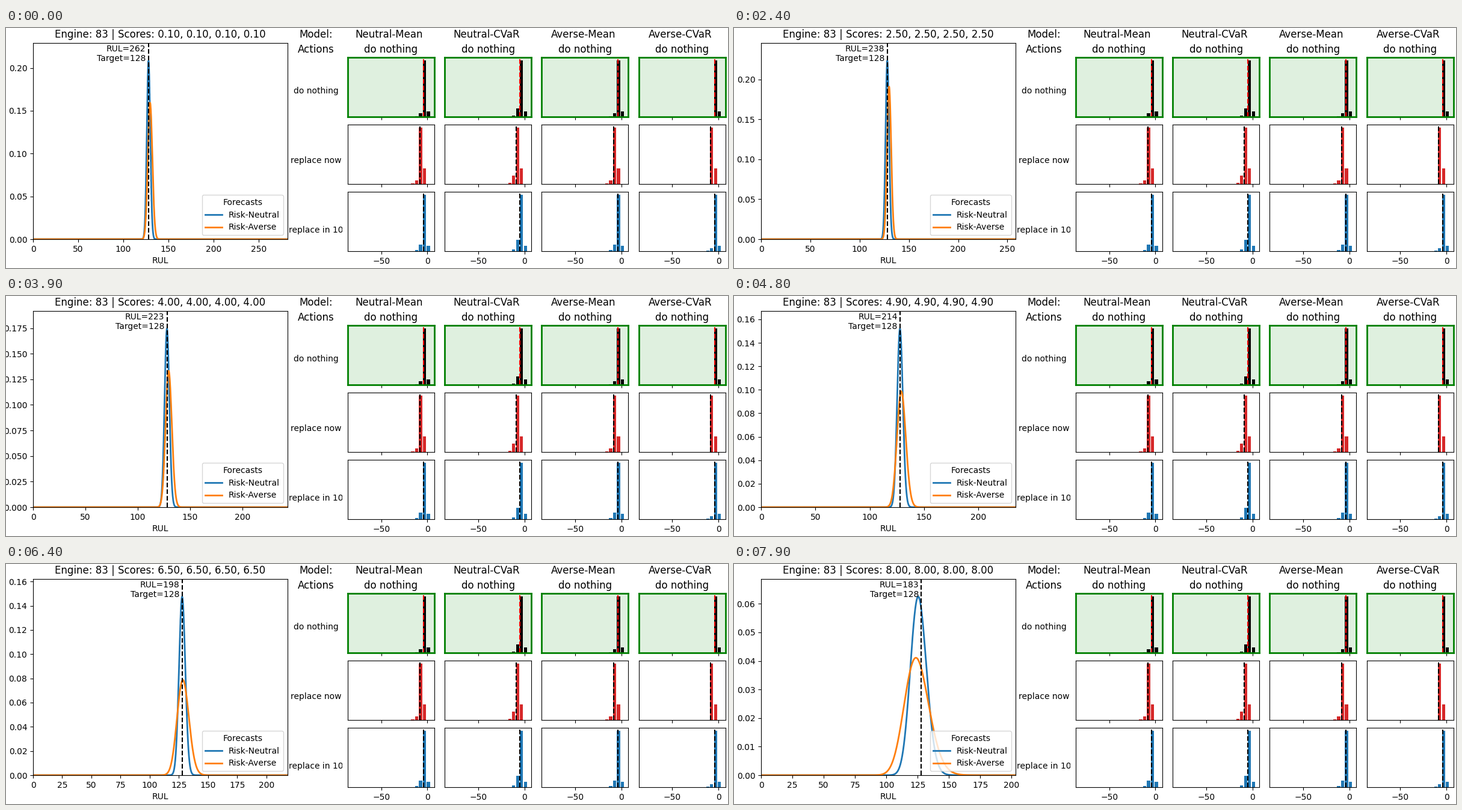
Animation of 1200x400 px, one loop 8 s. Source, as a matplotlib script:

```python
import numpy as np
import matplotlib.pyplot as plt
from matplotlib.animation import FuncAnimation
from matplotlib.patches import Rectangle

W, H, DPI = 1200, 400, 100
FRAMES, INTERVAL = 80, 100
TARGET, FIRST_RUL = 128, 262

# Peak density of each forecast at a few moments, linear in between
KEYS = [0, 9, 24, 39, 57, 71, 79]
NEUTRAL_PEAKS = [0.2086, 0.1734, 0.2235, 0.1745, 0.1297, 0.1654, 0.0625]
AVERSE_PEAKS = [0.1594, 0.136, 0.191, 0.1333, 0.0643, 0.0932, 0.0411]
DRIFT = 0.07  # a wider forecast leans further below its centre

# Model, height of the tail bar, distance from the main bar to the mean line
MODELS = [("Neutral-Mean", 6, 0.95), ("Neutral-CVaR", 14, 1.55),
          ("Averse-Mean", 6, 0.95), ("Averse-CVaR", 0.5, 0.95)]
# Action, bar colour, bins skipped on the right, first bar, extra tail
ACTIONS = [("do nothing", "black", 0, 9, 0),
           ("replace now", "tab:red", 1, 26, 0),
           ("replace in 10", "tab:blue", 0, 9, 5)]
MAIN_BAR, TAIL_DECAY = 95.2, 0.18
COST_LIM = (-86.4, 7.5)
BIN, LAST_EDGE = 4.27, 3.23

fig = plt.figure(figsize=(W / DPI, H / DPI), dpi=DPI, facecolor="white")


def add_axes(x, y, w, h):
    """Axes from a pixel box measured from the top left corner."""
    return fig.add_axes([x / W, 1 - (y + h) / H, w / W, h / H])


def label(x, baseline, text, size):
    fig.text(x / W, 1 - baseline / H, text, size=size, ha="center", va="baseline")


def mask(x, y, w, h):
    fig.add_artist(Rectangle((x / W, 1 - (y + h) / H), w / W, h / H,
                             transform=fig.transFigure, fc="white", ec="none",
                             zorder=10))


def draw_panel(row, col):
    _, color, skip, first, extra = ACTIONS[row]
    _, tail, lag = MODELS[col]
    tail += extra
    heights = [first, MAIN_BAR, tail, tail * TAIL_DECAY]
    centers = LAST_EDGE - BIN * (skip + np.arange(len(heights)) + 0.5)

    ax = add_axes(567.9 + 161.25 * col, 49 + 112 * row, 144, 99)
    ax.bar(centers, heights, width=0.8 * BIN, color=color)
    ax.axvline(centers[1] - lag, ls="--", color="black" if row else "red")
    ax.set(xlim=COST_LIM, ylim=(0, 100), xticks=[-50, 0], yticks=[])
    ax.tick_params(labelbottom=row == 2)
    if row == 0:
        ax.set_facecolor("#dff0df")
        for spine in ax.spines.values():
            spine.set(color="green", linewidth=2)


def forecast(x, center, peak):
    """Log-normal density with the given height at its mode."""
    sigma = 1 / (np.sqrt(2 * np.pi) * peak)
    mode = center - DRIFT * sigma ** 2
    return peak * np.exp(-0.5 * (np.log(x / mode) * mode / sigma) ** 2)


main = add_axes(45, 24.6, 422.6, 327.4)
main.set_xlabel("RUL")
neutral, = main.plot([], [], color="tab:blue", lw=2, label="Risk-Neutral")
averse, = main.plot([], [], color="tab:orange", lw=2, label="Risk-Averse")
main.axvline(TARGET, ls="--", color="black")
note = main.text(0, 0.99, "", transform=main.transAxes, ha="right", va="top")
title = main.set_title("")
main.legend(title="Forecasts", loc="lower right")

label(515.5, 16, "Model:", 12)
label(515.5, 40.7, "Actions", 12)
for row, action in enumerate(ACTIONS):
    label(515.3, 109 + 116 * row, action[0], 10)
for col, model in enumerate(MODELS):
    x = 637 + 161.25 * col
    label(x, 16, model[0], 12)
    label(x + 3, 40.7, "do nothing", 12)
    for row in range(len(ACTIONS)):
        draw_panel(row, col)

# The plot areas are cropped at these edges
mask(475.5, 357, 20, 22)
mask(559.3, 325, 6, 22)


def update(i):
    rul = FIRST_RUL - i
    right = rul + 20
    x = np.linspace(0.01, right, 1500)
    peak_n = np.interp(i, KEYS, NEUTRAL_PEAKS)
    peak_a = np.interp(i, KEYS, AVERSE_PEAKS)
    neutral.set_data(x, forecast(x, TARGET + 0.3, peak_n))
    averse.set_data(x, forecast(x, TARGET + 2.2, peak_a))
    main.set(xlim=(0, right), ylim=(0, 1.1 * peak_n))
    note.set_text(f"RUL={rul}\nTarget={TARGET}")
    note.set_x(TARGET / right - 0.0104)
    score = f"{(i + 1) / 10:.2f}"
    title.set_text("Engine: 83 | Scores: " + ", ".join([score] * 4))
    return neutral, averse, note, title


anim = FuncAnimation(fig, update, frames=FRAMES, interval=INTERVAL,
                     init_func=lambda: update(0), repeat=True, repeat_delay=0)
plt.show()
```
